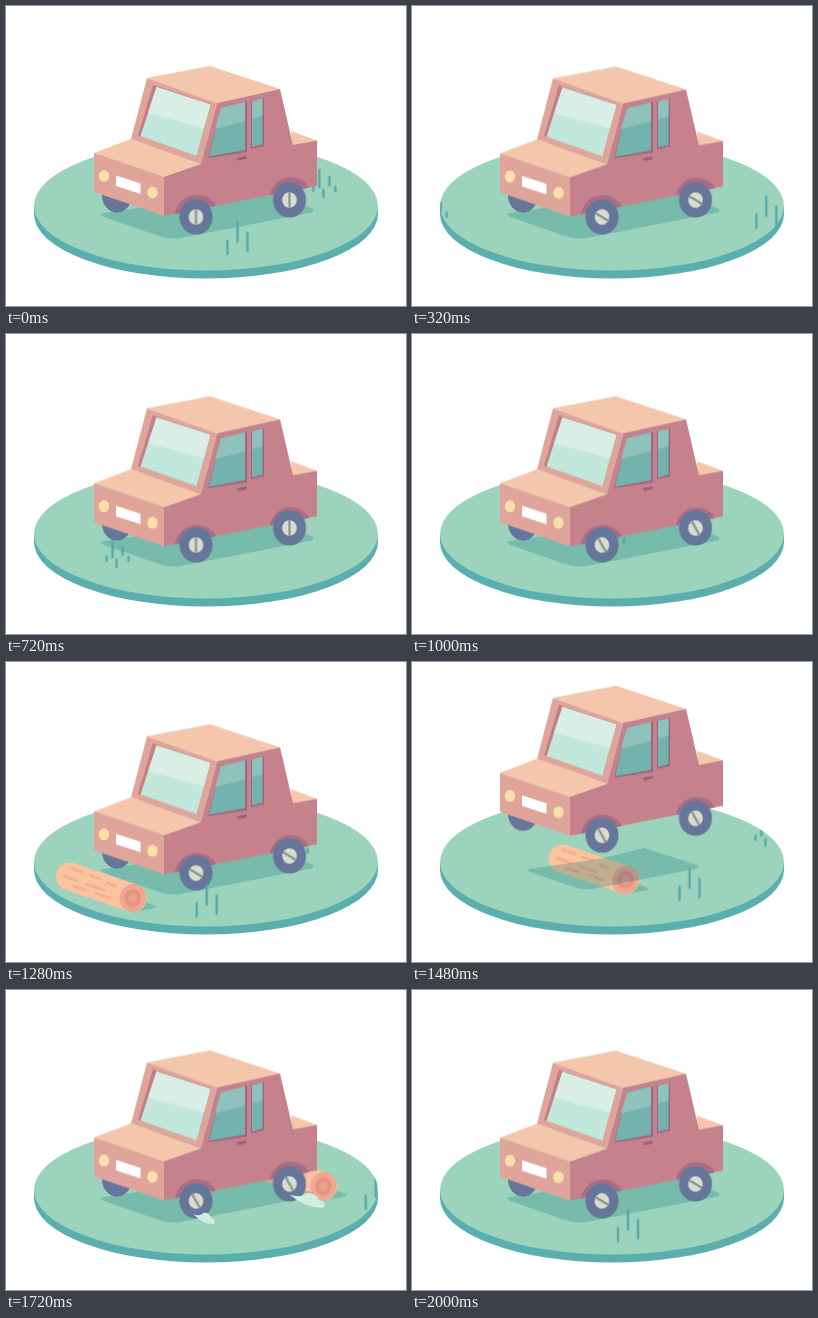
An HTML page without scripts for the animation above (2040 ms loop, 400x300 px).

```html
<!DOCTYPE html>
<html lang="en">
<head>
<meta charset="utf-8">
<title>Little car</title>
<style>
html, body { margin: 0; width: 100%; height: 100%; overflow: hidden; background: #fff; }
svg { display: block; width: 100%; height: 100%; }

.run, .bob, .jump, .shade, .spin, .leave, .sprout, .puff { animation: 2040ms linear infinite; }

/* ground items pass at constant speed; the delay sets when each is mid-way */
.run { animation-name: run; }
@keyframes run {
  from { transform: translate(calc(var(--x) * -1px), calc(var(--y) * 1px)); }
  to { transform: translate(calc(var(--x) * 1px), calc(var(--y) * -1px)); }
}
.near { --x: 392; --y: 84; }
.far { --x: 326; --y: 66; }
.log { --x: 442; --y: 92; animation-delay: -1580ms; }

.leave { animation-name: leave; }
@keyframes leave { 12%, 100% { transform: translate(78px, -16px); } }

.sprout { animation-name: sprout; }
@keyframes sprout { 0%, 36% { opacity: 0; } 40%, 100% { opacity: 1; } }

.bob { animation-name: bob; animation-timing-function: ease-in-out; }
@keyframes bob {
  0%, 13.73%, 27.45%, 41.18%, 54.9%, 68.63%, 82.35%, 96.08% { transform: none; }
  6.86%, 20.59%, 34.31%, 48.04%, 61.76%, 75.49%, 89.22% { transform: translateY(2.4px); }
  100% { transform: translateY(1.2px); }
}

.jump { animation-name: jump; }
@keyframes jump {
  0%, 66.4% { transform: none; animation-timing-function: cubic-bezier(.33, .67, .67, 1); }
  74.8% { transform: translateY(-40.5px); animation-timing-function: cubic-bezier(.33, 0, .67, .33); }
  83.2%, 100% { transform: none; }
}

.shade { animation-name: shade; transform-origin: 202px 206px; }
@keyframes shade {
  0%, 66.4% { transform: none; animation-timing-function: cubic-bezier(.33, .67, .67, 1); }
  74.8% { transform: scale(.79); animation-timing-function: cubic-bezier(.33, 0, .67, .33); }
  83.2%, 100% { transform: none; }
}

.spin { animation-name: spin; }
@keyframes spin { from { transform: rotate(0deg); } to { transform: rotate(-1530deg); } }

.puff { animation-name: puff; }
@keyframes puff {
  0%, 82.6% { transform: scale(.3); opacity: 0; }
  83.2% { transform: scale(.6); opacity: 1; }
  84.3% { transform: none; opacity: 1; }
  90% { transform: translate(16px, -3px) scale(.8); opacity: .6; }
  94%, 100% { transform: translate(26px, -5px) scale(.2); opacity: 0; }
}

.grass { fill: none; stroke: #55a9a9; stroke-width: 2.4; stroke-linecap: round; }
.blend { mix-blend-mode: multiply; }
.peach { fill: #f4c6ac; }
.front { fill: #dfa59b; }
.side { fill: #c6828c; }
.arch { fill: #a56d86; }
.tyre { fill: #66759a; }
.trim { fill: #9c6680; }
.pane { fill: #74b2ad; }
.shine { fill: #8fc2ba; }
.lamp { fill: #fae0a8; }
</style>
</head>
<body>
<svg viewBox="0 0 400 300">
  <defs>
    <clipPath id="disc"><path d="M28 200A172 64.5 0 0 1 372 200V208A172 64.5 0 0 1 28 208Z"/></clipPath>
    <path id="tuft" d="M221 235V248M231 217V236M241 227V245"/>
    <path id="patch" d="M307 181V185M313 164V181M317 184V191M323 171V179M329 181V185"/>
    <path id="dust" d="M-3 -5Q4 -2 7 -6Q13 -7 15 -1Q20 1 18 5Q7 6 -3 -5Z"/>
    <g id="hub">
      <circle r="7.8" fill="#d9ddd0"/>
      <path d="M0 -7.5V7.5" stroke="#8d948f" stroke-width="2.4"/>
    </g>
  </defs>

  <path d="M28 200V208A172 64.5 0 0 0 372 208V200Z" fill="#5aaeae"/>
  <ellipse cx="200" cy="200" rx="172" ry="64.5" fill="#9bd3bc"/>

  <g clip-path="url(#disc)">
    <g class="run log">
      <path d="M150 207L213 231Q230 230 237 227L205 212Z" fill="#4a9f94" opacity=".45"/>
      <path d="M150 196.500L213 218" stroke="#fac4a0" stroke-width="28" stroke-linecap="round"/>
      <path d="M150 188L162 192M170 195L180 198.500M144 196L158 201M166 204L184 210M188 203L196 206M153 206L166 210M176 213L190 218"
        stroke="#f4b08c" stroke-width="2.6" stroke-linecap="round"/>
      <g transform="translate(213 218) rotate(18)">
        <ellipse rx="13" ry="14.2" fill="#f0a691"/>
        <ellipse rx="8" ry="9" fill="#e59285"/>
        <ellipse rx="4.200" ry="5" fill="#eda08f"/>
      </g>
    </g>
  </g>

  <g class="blend">
    <path class="shade" d="M97 207L187 194L240 181L305 202Q311 205 303 207L180 231Q165 235 150 229L98 211Q93 209 97 207Z" fill="#c3e3e7"/>
  </g>

  <g class="grass" clip-path="url(#disc)">
    <use href="#patch" class="leave"/>
    <use href="#patch" class="run far" style="animation-delay:-1693ms"/>
    <g transform="translate(0 -34)"><use href="#patch" class="run far" style="animation-delay:-1818ms"/></g>
  </g>

  <g class="jump">
    <ellipse class="tyre" cx="111" cy="189.500" rx="15" ry="17"/>
    <g class="bob">
      <path class="peach" d="M141 72L204 60L274 83L211 97ZM88 147L125 133L195 158L158 171ZM285 125L311 134.500L286 140Z"/>
      <path class="front" d="M141 72L211 97L195 158L125 133ZM88 147L158 171V210L88 186Z"/>
      <path class="side" d="M158 171L195 158L211 97L274 83L287 139L311 134.500V180L158 210Z"/>

      <path d="M147 79L205 98L190.500 150L132 129.500Z" fill="#c27f86"/>
      <path d="M150.500 81L204.500 98.500L190.500 150L134.500 130.300Z" fill="#c2e8db"/>
      <path d="M150.500 81L204.500 98.500L198 122L142 107Z" fill="#d9eee5"/>

      <path class="trim" d="M215 102L241 95.500V146L202 152Z"/>
      <path class="pane" d="M215 102L239 96V144L203 150.500Z"/>
      <path class="shine" d="M215 102L239 96V115L209 123Z"/>
      <path class="trim" d="M245 95L258 92V140L245 143Z"/>
      <path class="pane" d="M246 95L256.500 92.500V138.500L246 141Z"/>
      <path class="shine" d="M246 95L256.500 92.500V110L246 113Z"/>
      <path d="M232.500 153L239.500 151.700" stroke="#96607a" stroke-width="2.8" stroke-linecap="round"/>

      <ellipse class="lamp" cx="98" cy="170" rx="5.200" ry="6"/>
      <ellipse class="lamp" cx="146.500" cy="186.500" rx="5.200" ry="6"/>
      <path d="M110 169.500L134.500 177.500V188L110 180Z" fill="#fff"/>

      <path class="arch" d="M169 208A22 22 0 0 1 210 200ZM264 189.300A21 21 0 0 1 303 181.700Z"/>
    </g>
    <g transform="translate(190 211) scale(.94 1)">
      <circle class="tyre" r="17.6"/>
      <g class="spin"><use href="#hub"/></g>
    </g>
    <g transform="translate(283.500 194) scale(.94 1)">
      <circle class="tyre" r="17.6"/>
      <g class="spin"><use href="#hub"/></g>
    </g>
  </g>

  <g fill="#d3eee1">
    <g transform="translate(190 229)"><use href="#dust" class="puff"/></g>
    <g transform="translate(288 211) scale(1.650 1.300)"><use href="#dust" class="puff"/></g>
  </g>

  <g class="grass" clip-path="url(#disc)">
    <g class="sprout" style="animation-delay:-1020ms"><use href="#tuft" class="run near" style="animation-delay:-1020ms"/></g>
    <g class="sprout" style="animation-delay:-1700ms"><use href="#tuft" class="run near" style="animation-delay:-1700ms"/></g>
  </g>
</svg>
</body>
</html>
```
